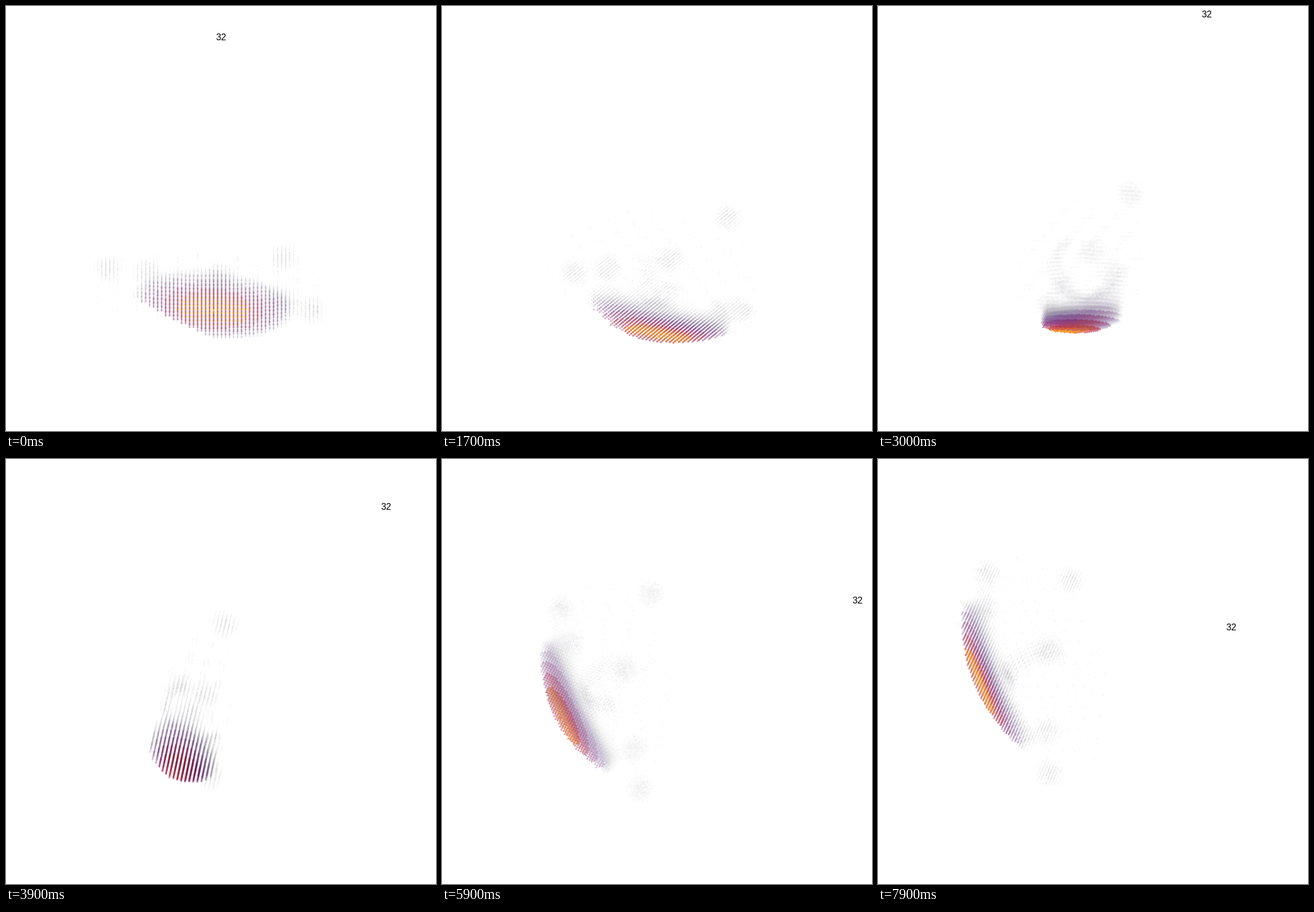
These frames come from a looping animation (753x744 px, 8000 ms). An HTML page with a canvas:

```html
<!DOCTYPE html>
<html lang="en">
<head>
<meta charset="utf-8">
<title>Rotating activity map</title>
<style>
html, body { margin: 0; width: 100%; height: 100%; overflow: hidden; background: #fff; }
canvas { display: block; }
#label { position: absolute; left: 0; top: 0; font: 16px/18px "Liberation Sans", Arial, sans-serif; color: #000; letter-spacing: -0.4px; }
</style>
</head>
<body>
<canvas id="stage" width="753" height="744"></canvas>
<div id="label">32</div>
<script>
const LOOP = 8000, STEP = 100, GRID = 7, DEG = Math.PI / 180;
const ctx = document.getElementById('stage').getContext('2d');
const label = document.getElementById('label');

const { sin, cos, tanh, max, min, hypot } = Math;
const sq = x => x * x;
const gauss = (x, s) => Math.exp(-sq(x / s));

// label centre: seconds, x, y
const PATH = [
  [0, 376, 55], [2, 507, -32], [3, 575, 15], [3.9, 665, 84],
  [5.1, 734, 194], [6.8, 696, 292], [7.9, 618, 295]
];

// centres of the faint spots, in grid axes u v w
const SPOTS = [[-185, -55, 72], [-115, -40, 95], [172, 28, 90], [120, 0, 70], [15, -15, 145], [122, -20, 240]];

// colour ramp, evenly spaced from low to high
const RAMP = ['000004', '280b54', '65156e', '9f2a63', 'd44842', 'f57d15', 'fac127', 'fcffa4']
  .map(hex => [0, 2, 4].map(i => parseInt(hex.substr(i, 2), 16)));

function ramp(v) {
  const x = min(0.999, v) * (RAMP.length - 1), i = Math.floor(x);
  return RAMP[i].map((c, k) => Math.round(c + (RAMP[i + 1][k] - c) * (x - i)));
}

function hash(a, b, c) {
  const n = sin(a * 12.99 + b * 78.23 + c * 37.72) * 43758.55;
  return n - Math.floor(n);
}

// strong patch: a thin layer under a shallow curved surface
function patch(u, v, w) {
  const depth = w - u * u / 580 - v * v / 200;
  const tilted = v - u * 0.08;
  if (depth < 0 || depth > 58 || v > 58 + min(0, u) * 0.5) return 0;
  const rim = 1 - sq(u / 145) - sq(tilted / 66);
  if (rim < 0) return 0;
  return 1.2 * gauss(u, 108) * gauss(tilted, 42) * min(1, rim * 4) * Math.pow(1 - depth / 58, 2.2);
}

// weak activity: spots, a curved band and a scattered texture
function faint(u, v, w) {
  const wave = sin(u * 0.09 + 1) * sin(v * 0.11 + 2) * sin(w * 0.1 + u * 0.03);
  let s = 0;
  for (const [a, b, c] of SPOTS) s += 0.1 * gauss(hypot(u - a, v - b, w - c), 23);
  const dv = v + 8, dw = w - 117, turn = Math.atan2(dv, -dw);
  if (turn > -0.9 && turn < 2.5) {
    s += 0.13 * gauss(hypot(dv, dw) - 56, 8) * gauss(u, 24) * (1 - 0.15 * turn);
  }
  if (sq(u / 215) + sq(v / 66) + sq((w - 115) / 125) < 1) s += 0.12 * max(0, wave - 0.55);
  return s * (0.4 + 0.7 * hash(u, v, w));
}

const points = [];
for (let u = -217; u <= 217; u += GRID) {
  for (let v = -70; v <= 70; v += GRID) {
    for (let w = 0; w <= 259; w += GRID) {
      const value = min(1, patch(u, v, w) + faint(u, v, w));
      if (value < 0.02) continue;
      const fill = `rgba(${ramp(value * 0.87)},${Math.pow(value, 1.15).toFixed(3)})`;
      points.push({ u, v, w, fill, z: 0 });
    }
  }
}

// smooth curve through keyed rows
function sample(keys, t) {
  const last = keys.length - 1;
  t = min(t, keys[last][0]);
  let i = 0;
  while (i < last - 1 && t >= keys[i + 1][0]) i++;
  const a = keys[i], b = keys[i + 1];
  const p = keys[max(0, i - 1)], n = keys[min(last, i + 2)];
  const d = b[0] - a[0], x = (t - a[0]) / d;
  return [1, 2].map(k => {
    const m0 = (b[k] - p[k]) / (b[0] - p[0]) * d;
    const m1 = (n[k] - a[k]) / (n[0] - a[0]) * d;
    return a[k] + (b[k] - a[k]) * x * x * (3 - 2 * x) + m0 * x * sq(1 - x) + m1 * x * x * (x - 1);
  });
}

// screen vectors [x, y, depth] of the grid axes
function axes(t) {
  const spin = (91 * (tanh((t - 3.6) / 2.6) + tanh(3.6 / 2.6))) * DEG;
  const pitch = (18 + 97 * sin(Math.PI * t / 9.8)) * DEG;
  const roll = 36 * (1 + tanh((t - 5) / 1.5)) * DEG;
  const turn = ([x, y, z]) => [x * cos(roll) - y * sin(roll), x * sin(roll) + y * cos(roll), z];
  return [
    [cos(spin), sin(spin) * cos(pitch), sin(spin) * sin(pitch)],
    [-sin(spin), cos(spin) * cos(pitch), cos(spin) * sin(pitch)],
    [0, -sin(pitch), cos(pitch)]
  ].map(turn);
}

function draw(t) {
  const [U, V, W] = axes(t);
  const cx = 276 + 105 * cos((t - 1.2) / 2.05);
  const cy = 485 + 97 * cos((t - 2.1) / 2);
  const place = (p, k) => p.u * U[k] + p.v * V[k] + p.w * W[k];
  for (const p of points) p.z = place(p, 2);
  points.sort((a, b) => b.z - a.z);

  ctx.fillStyle = '#fff';
  ctx.fillRect(0, 0, 753, 744);
  for (const p of points) {
    ctx.fillStyle = p.fill;
    ctx.beginPath();
    ctx.arc(cx + place(p, 0), cy + place(p, 1), 1.7, 0, 7);
    ctx.fill();
  }

  const [lx, ly] = sample(PATH, t);
  label.style.transform = `translate(${Math.round(lx - 8.5)}px, ${Math.round(ly - 9)}px)`;
}

let shown = -1;
function tick() {
  const t = Math.floor(performance.now() % LOOP / STEP) * STEP;
  if (t !== shown) draw((shown = t) / 1000);
  requestAnimationFrame(tick);
}
tick();
</script>
</body>
</html>
```
